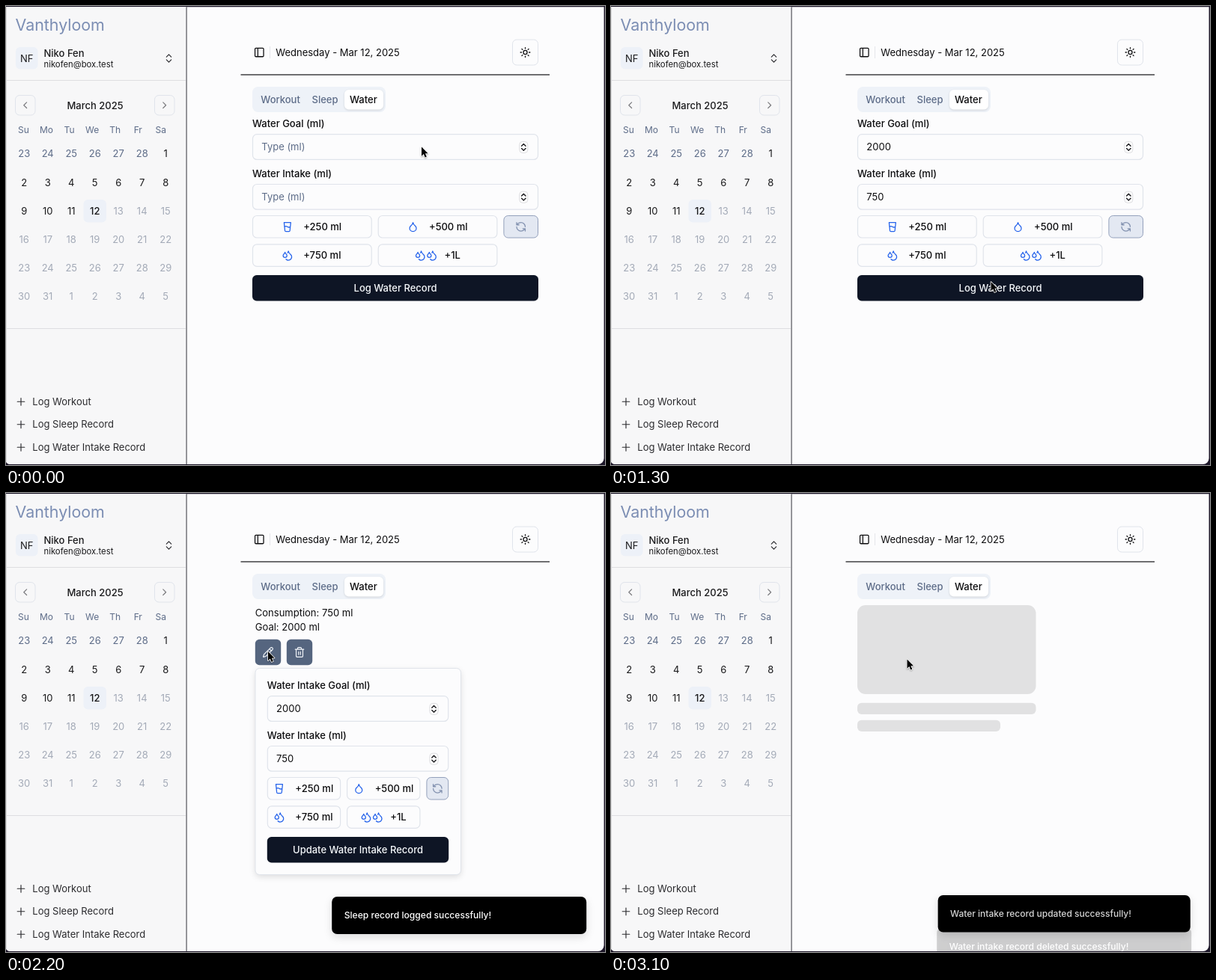
Write an HTML page with a canvas that moves like this. It is 800 px wide and 614 px high and loops after 3.2 s.

```html
<!DOCTYPE html>
<html lang="en">
<head>
<meta charset="utf-8">
<title>Health log</title>
<style>
  html, body { margin: 0; width: 100%; height: 100%; overflow: hidden; background: #fcfcfd; }
  canvas { display: block; width: 800px; height: 614px; }
</style>
</head>
<body>
<canvas id="stage" width="800" height="614"></canvas>
<script>
const ctx = document.getElementById('stage').getContext('2d');
const LOOP = 3200, STEP = 100;

const INK = '#0c0c0e', NAVY = '#0e1525', MUTED = '#5d6c88', BORDER = '#e0e4eb',
      TINT = '#edf1f8', BLUE = '#2563eb', PAGE = '#fcfcfd';

// Icons on a 24 unit grid
const icons = {
  panel: 'M5 3h14a2 2 0 0 1 2 2v14a2 2 0 0 1-2 2H5a2 2 0 0 1-2-2V5a2 2 0 0 1 2-2zM9 3v18',
  sun: 'M16 12a4 4 0 1 1-8 0a4 4 0 1 1 8 0M12 2v2M12 20v2M2 12h2M20 12h2M4.9 4.9l1.4 1.4M17.7 17.7l1.4 1.4M6.3 17.7l-1.4 1.4M19.1 4.9l-1.4 1.4',
  sort: 'M7 15l5 5 5-5M7 9l5-5 5 5',
  left: 'M15 18l-6-6 6-6',
  right: 'M9 18l6-6-6-6',
  plus: 'M4 12h16M12 4v16',
  glass: 'M15.2 22H8.8a2 2 0 0 1-2-1.8L5 3h14l-1.8 17.2A2 2 0 0 1 15.2 22zM6 12a5 5 0 0 1 6 0 5 5 0 0 0 6 0',
  drop: 'M12 22a7 7 0 0 0 7-7c0-2-1-3.9-3-5.5s-3.5-4-4-6.5c-.5 2.5-2 4.9-4 6.5S5 13 5 15a7 7 0 0 0 7 7z',
  drops: 'M7 16.3c2.2 0 4-1.8 4-4 0-1.2-.6-2.3-1.7-3.2S7.3 6.8 7 5.3c-.3 1.5-1.1 2.8-2.3 3.8S3 11.1 3 12.3c0 2.2 1.8 4 4 4zM12.6 6.6A11 11 0 0 0 14 3c.5 2.5 2 4.9 4 6.5s3 3.5 3 5.5a7 7 0 0 1-11.9 5',
  refresh: 'M21 12a9 9 0 0 0-9-9 9.8 9.8 0 0 0-6.7 2.7L3 8M3 3v5h5M3 12a9 9 0 0 0 9 9 9.8 9.8 0 0 0 6.7-2.7L21 16M16 16h5v5',
  pencil: 'M21.2 6.8a1 1 0 0 0-4-4L3.8 16.2a2 2 0 0 0-.5.8L2 21.4a.5.5 0 0 0 .6.6L7 20.7a2 2 0 0 0 .8-.5zM15 5l4 4',
  trash: 'M3 6h18M19 6v14c0 1-1 2-2 2H7c-1 0-2-1-2-2V6M8 6V4c0-1 1-2 2-2h4c1 0 2 1 2 2v2M10 11v6M14 11v6'
};
for (const name in icons) icons[name] = new Path2D(icons[name]);

const clamp = v => Math.max(0, Math.min(1, v));

// Text placed by the middle of its capitals
function text(str, x, y, { size = 13, weight = 400, color = INK, align = 'left' } = {}) {
  ctx.font = `${weight} ${size}px Inter, sans-serif`;
  ctx.textAlign = align;
  ctx.fillStyle = color;
  ctx.fillText(str, x, y + size * 0.36);
}

function box(x, y, w, h, { r = 5.7, fill, stroke, line = 1, shadow } = {}) {
  ctx.save();
  ctx.beginPath();
  ctx.roundRect(x, y, w, h, r);
  if (shadow) {
    [ctx.shadowOffsetY, ctx.shadowBlur] = shadow;
    ctx.shadowColor = 'rgba(0,0,0,.13)';
  }
  if (fill) { ctx.fillStyle = fill; ctx.fill(); }
  ctx.shadowColor = 'transparent';
  if (stroke) { ctx.strokeStyle = stroke; ctx.lineWidth = line; ctx.stroke(); }
  ctx.restore();
}

function rect(x, y, w, h, color) {
  ctx.fillStyle = color;
  ctx.fillRect(x, y, w, h);
}

function icon(name, x, y, color = INK, size = 15.3, line = 2) {
  ctx.save();
  ctx.translate(x - size / 2, y - size / 2);
  ctx.scale(size / 24, size / 24);
  ctx.lineWidth = line;
  ctx.lineCap = ctx.lineJoin = 'round';
  ctx.strokeStyle = color;
  ctx.stroke(icons[name]);
  ctx.restore();
}

function calendar() {
  [['left', 12.5], ['right', 198.5]].forEach(([name, x]) => {
    box(x, 119.5, 26.5, 26.5, { stroke: BORDER });
    icon(name, x + 13.2, 132.7, '#7d7d80', 15.3, 1.9);
  });
  text('March 2025', 119, 133, { weight: 500, align: 'center', color: '#1b1b1d' });
  ['Su', 'Mo', 'Tu', 'We', 'Th', 'Fr', 'Sa'].forEach((day, i) =>
    text(day, 23.5 + i * 30.55, 166, { size: 12, color: MUTED, align: 'center' }));

  box(103.5, 259, 30.5, 30.5, { fill: TINT });
  for (let i = 0; i < 42; i++) {
    const day = i - 5;
    const label = day < 1 ? day + 28 : day > 31 ? day - 31 : day;
    const color = day < 1 ? MUTED : day > 12 ? '#a3aab7' : '#18181a';
    text(label, 24.2 + (i % 7) * 31.5, 197.8 + Math.floor(i / 7) * 38.2,
      { color, align: 'center', weight: day === 12 ? 500 : 400 });
  }
}

function sidebar() {
  rect(0, 0, 241, 614, '#f7f7f8');
  rect(0, 0, 1, 614, '#dededf');
  rect(240.5, 0, 1.2, 614, '#55555a');
  text('Vanthyloom', 12.5, 25, { size: 21.4, color: '#7b8db3' });

  box(13, 55, 29.5, 29.5, { fill: TINT });
  text('NF', 27.7, 70, { align: 'center', color: '#1b1b1d' });
  text('Niko Fen', 50.5, 63, { weight: 500, color: '#1b1b1d' });
  text('nikofen@box.test', 50.5, 77.5, { size: 11.3, color: '#1b1b1d' });
  icon('sort', 217.5, 70, '#303034');
  rect(0, 99, 240, 1, '#dedee1');

  calendar();

  rect(0, 431, 240, 1, '#dedee1');
  ['Log Workout', 'Log Sleep Record', 'Log Water Intake Record'].forEach((label, i) => {
    const y = 529.3 + i * 30.5;
    icon('plus', 20, y, '#2b2b2e', 14.5, 1.9);
    text(label, 35.3, y, { color: '#2b2b2e' });
  });
}

function header() {
  icon('panel', 338.3, 62);
  rect(352, 54, 1, 16, '#e4e6ea');
  text('Wednesday - Mar 12, 2025', 360.3, 62);
  box(676.5, 45, 34, 34, { stroke: BORDER, fill: PAGE });
  icon('sun', 693.5, 62);
  rect(313.5, 91.3, 412.5, 1.3, '#252528');

  box(329, 108, 178, 34, { r: 7.6, fill: '#eef2f8' });
  box(452, 112, 52, 26.5, { fill: '#fff', shadow: [1, 3] });
  text('Workout', 340.3, 125.5, { weight: 500, color: MUTED });
  text('Sleep', 408.5, 125.5, { weight: 500, color: MUTED });
  text('Water', 459, 125.5, { weight: 500 });
}

function field(x, y, w, value, focused) {
  if (focused) {
    box(x - 0.2, y - 0.7, w + 0.4, 35.2, { r: 6, stroke: '#8d91a1', line: 4 });
    box(x + 0.5, y, w - 1, 33.7, { fill: PAGE, stroke: '#161c2e', line: 2 });
  } else {
    box(x + 0.5, y, w - 1, 33.7, { stroke: BORDER, line: 1.2 });
  }
  text(value || 'Type (ml)', x + 12.3, y + 17, { color: value ? INK : MUTED });
  const sx = x + w - 19.7, sy = y + 17.2;
  box(sx - 5.5, sy - 7.5, 11, 15, { r: 4, fill: '#fff', stroke: '#dcdcdf' });
  icon('sort', sx, sy, '#202024', 13, 2.7);
}

function tile(x, y, w, label, iconName, hovered) {
  box(x + 0.5, y + 0.5, w - 1, 29.5, { fill: hovered ? TINT : PAGE, stroke: BORDER, line: 1.2 });
  const mid = x + w / 2, cy = y + 15.3, pair = iconName === 'pair';
  if (pair) {
    icon('drops', mid - 23.3, cy, BLUE);
    icon('drops', mid - 8, cy, BLUE);
  } else {
    icon(iconName, mid - 33, cy, BLUE);
  }
  text(label, mid + (pair ? 9 : -11.6), cy, { weight: 500 });
}

function submit(x, y, w, label, hovered) {
  box(x, y, w, 34.4, { fill: hovered ? '#212838' : NAVY });
  text(label, x + w / 2, y + 17.2, { weight: 500, color: '#f6f9fc', align: 'center' });
}

function form({ x, y, w, tileW, goalLabel, button, goal, intake, focused, hover }) {
  text(goalLabel, x, y, { weight: 500 });
  field(x, y + 14.7, w, goal, focused);
  text('Water Intake (ml)', x, y + 67, { weight: 500 });
  field(x, y + 81.5, w, intake);

  const second = x + tileW + 8, third = second + tileW + 8;
  tile(x, y + 123, tileW, '+250 ml', 'glass', hover === 250);
  tile(second, y + 123, tileW, '+500 ml', 'drop');
  tile(x, y + 161.3, tileW, '+750 ml', 'drops', hover === 750);
  tile(second, y + 161.3, tileW, '+1L', 'pair');
  box(third + 0.5, y + 123.5, x + w - third - 1, 29.5, { fill: '#e3e8f2', stroke: '#93a0bb' });
  icon('refresh', (third + x + w) / 2, y + 138.3, '#8392b0');
  submit(x, y + 203, w, button, hover === 'submit');
}

function record(amount) {
  text(`Consumption: ${amount} ml`, 332.8, 160);
  text('Goal: 2000 ml', 332.8, 179);
  ['pencil', 'trash'].forEach((name, i) => {
    box(332.8 + i * 42, 195.8, 34.4, 34.4, { fill: '#55657f' });
    icon(name, 350 + i * 42, 213, '#f4f7fb', 15.3, 1.8);
  });
}

function popover(t) {
  box(333, 234.5, 274.5, 276, { r: 5.7, fill: PAGE, stroke: BORDER, shadow: [3, 8] });
  form({
    x: 348.8, y: 257, w: 242.4, tileW: 98.3,
    goalLabel: 'Water Intake Goal (ml)', button: 'Update Water Intake Record',
    goal: '2000', intake: t < 2500 ? '750' : '1000',
    hover: t >= 2600 ? 'submit' : t >= 2400 ? 250 : 0
  });
}

function skeleton() {
  const fill = '#e1e1e2';
  box(329, 150, 238.5, 119, { r: 11, fill });
  box(329, 280.7, 238.5, 15.3, { fill });
  box(329, 303.7, 191, 15.3, { fill });
}

// enter: 0 below the edge, 1 in place; depth: how far it sits behind a newer toast
function toast(message, enter, depth) {
  if (enter <= 0) return;
  const scale = 1 - 0.05 * depth;
  ctx.save();
  ctx.translate(605.2, 565 + 50 * (1 - enter) - 13.4 * depth);
  ctx.scale(scale, scale);
  ctx.globalAlpha = enter;
  box(-170, -25, 340, 50, { r: 7, fill: '#000', shadow: [4, 12] });
  ctx.globalAlpha = 1 - depth;
  text(message, -153.5, 0, { size: 12.1, weight: 500, color: '#fff' });
  ctx.restore();
}

function toasts(t) {
  const enter = start => clamp((t - start) / 200);
  const saved = enter(1700), updated = enter(2704), deleted = enter(3066);
  if (t < 3100) toast('Sleep record logged successfully!', saved, updated);
  toast('Water intake record updated successfully!', updated, deleted);
  toast('Water intake record deleted successfully!', deleted, 0);
}

// Pointer stops: time, x, y
const stops = [
  [0, 555, 188.5], [500, 555, 188.5], [800, 460, 315.5], [900, 436, 334], [1100, 436, 334],
  [1200, 470, 357], [1400, 545, 381], [1900, 545, 381], [2100, 350, 212], [2200, 350, 212],
  [2400, 388.5, 399], [2500, 388.5, 399], [2600, 419.5, 484.5], [2800, 419.5, 484.5],
  [3000, 395.5, 222.5], [3200, 395.5, 222.5]
];

function pointer(t) {
  const i = stops.findIndex(s => s[0] > t);
  const [t0, x0, y0] = stops[i - 1], [t1, x1, y1] = stops[i];
  const k = (t - t0) / (t1 - t0), e = k * k * (3 - 2 * k);
  ctx.save();
  ctx.translate(x0 + (x1 - x0) * e, y0 + (y1 - y0) * e);
  ctx.shadowColor = 'rgba(0,0,0,.3)';
  ctx.shadowBlur = 2;
  ctx.shadowOffsetY = 1;
  const arrow = new Path2D('M0 0V12.2L2.8 9.6L4.7 14L6.8 13.1L4.9 8.8H8.6Z');
  ctx.lineWidth = 1.6;
  ctx.lineJoin = 'round';
  ctx.strokeStyle = '#fff';
  ctx.stroke(arrow);
  ctx.shadowColor = 'transparent';
  ctx.fillStyle = '#000';
  ctx.fill(arrow);
  ctx.restore();
}

function content(t) {
  if (t < 1800) {
    form({
      x: 329, y: 157, w: 382, tileW: 159.7,
      goalLabel: 'Water Goal (ml)', button: 'Log Water Record',
      goal: '2000'.slice(0, Math.max(0, t / STEP - 1)),
      intake: t < 1000 ? '' : '750',
      focused: t >= 100 && t < 1000,
      hover: t >= 1400 ? 'submit' : t >= 900 && t < 1200 ? 750 : 0
    });
  } else if (t < 1900 || t >= 3100) {
    skeleton();
  } else {
    record(t < 2800 ? 750 : 1000);
    if (t >= 2200 && t < 2800) popover(t);
  }
}

function draw(t) {
  rect(0, 0, 800, 614, '#1d1729');
  ctx.save();
  ctx.beginPath();
  ctx.roundRect(0, 1.2, 798.6, 611.8, [0, 0, 8, 5]);
  ctx.clip();
  rect(0, 0, 800, 614, PAGE);
  sidebar();
  header();
  content(t);
  toasts(t);
  pointer(t);
  ctx.restore();
}

function tick(now) {
  draw(Math.floor((now % LOOP) / STEP) * STEP);
  requestAnimationFrame(tick);
}
draw(0);
requestAnimationFrame(tick);
</script>
</body>
</html>
```
